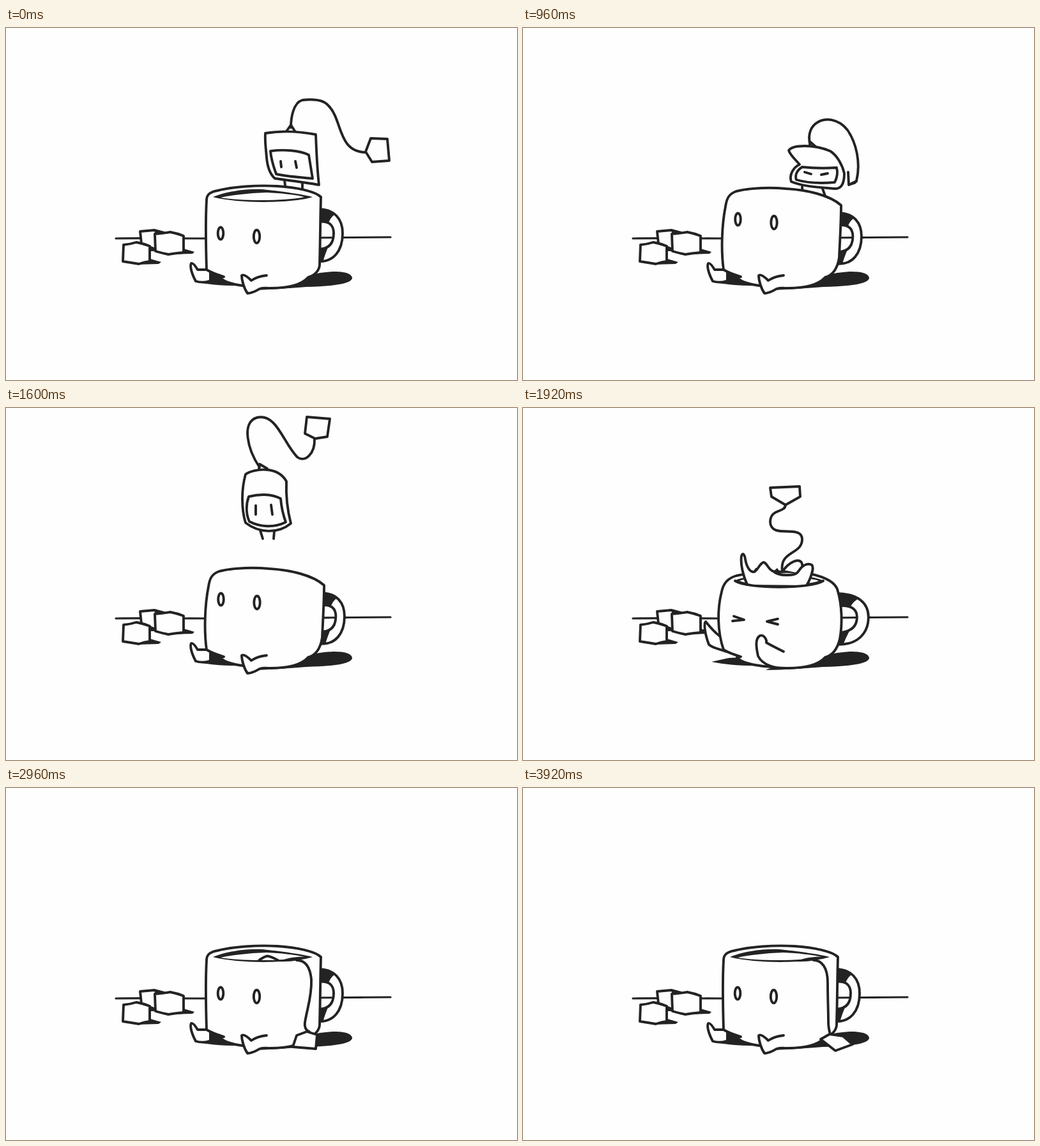
An HTML page for the animation above (4 s loop, 800x552 px).

```html
<!DOCTYPE html>
<html lang="en">
<head>
<meta charset="utf-8">
<title>Tea time</title>
<style>
html, body { margin: 0; width: 100%; height: 100%; overflow: hidden; background: #fefefe; }
svg { display: block; width: 100vw; height: 100vh; }
.line, .paper { stroke: #232323; stroke-width: 3.9; stroke-linecap: round; stroke-linejoin: round; vector-effect: non-scaling-stroke; }
.line { fill: none; }
.paper { fill: #fefefe; }
.ink { fill: #232323; }
.white { fill: #fefefe; }
</style>
</head>
<body>
<svg viewBox="0 0 800 552">
  <path class="line" style="stroke-width:3.2" d="M172 330C220 329 270 330 313 330M480 329L602 328"/>
  <g id="cubes">
    <path class="ink" d="M206 371L226 362L243 367L239 370ZM254 355L278 346L295 351L292 354Z"/>
    <path class="paper" d="M210 319L232 317L247 321L234 347L212 338Z"/>
    <path class="ink" d="M232 317L249 321L234 324ZM226 345L234 346L234 350L226 350Z"/>
    <path class="paper" d="M233 323Q246 322 257 320Q268 322 278 326L278 352Q266 353 254 355Q244 353 234 350Z"/>
    <path class="paper" d="M184 340Q195 339 204 336Q215 338 225 342L225 366Q217 367 208 370Q196 368 183 366Z"/>
  </g>
  <path class="ink" d="M380 411C388 405 440 400 474 388C500 380 541 379 542 392C541 402 508 405 470 406C440 408 410 411 380 411Z"/>
  <path class="ink" id="shade"/>
  <g id="cord">
    <path class="line" id="string"/>
    <path class="paper" id="tag"/>
  </g>
  <g id="bag">
    <path class="line" id="neck"/>
    <path class="line" id="knot"/>
    <path class="paper" id="sack"/>
    <path class="paper" id="face"/>
    <path class="line" id="look"/>
  </g>
  <g id="mug">
    <g id="handle">
      <path class="paper" fill-rule="evenodd" d="M488 284C515 284 527 300 527 322C527 350 512 368 488 366ZM488 304C505 302 513 308 513 322C513 338 505 347 488 347Z"/>
      <path class="ink" d="M490 284C502 284 509 287 515 292C510 296 507 300 505 306C500 303 495 303 490 304ZM490 348C497 347 501 345 505 342C501 351 498 360 496 367L490 367Z"/>
    </g>
    <path class="paper" id="footL"/>
    <path class="paper" id="body"/>
    <path class="ink" id="rim"/>
    <path class="white" id="tea"/>
    <path class="ink" id="glint" d="M428 272C440 266 455 264 472 265C462 270 446 273 428 272Z"/>
    <path class="paper" id="bump"/>
    <g id="splash">
      <path class="paper" d="M408 254C416 243 430 235 436 242C439 248 436 252 432 259"/>
      <path class="ink" d="M360 257L364 251L371 251L369 257ZM391 257L398 251L404 259Z"/>
      <path class="paper" d="M351 277C345 264 340 245 342 232C344 226 347 230 348 237C350 249 355 257 361 257C367 257 370 243 377 242C382 243 385 255 392 256C397 261 405 262 412 262C420 262 428 262 432 255C436 248 445 242 452 246C456 250 452 260 450 266C448 271 446 275 444 278"/>
    </g>
    <path class="line" id="lip" d="M332 271C352 284 450 284 470 271"/>
    <path class="paper" id="footR"/>
    <g id="open">
      <ellipse class="paper" cx="336" cy="322" rx="4.3" ry="9.5"/>
      <ellipse class="paper" cx="392.5" cy="327" rx="4.7" ry="10.3"/>
    </g>
    <path class="line" id="squint" d="M330 319L346 326.500L328 329M399 324.500L382 330L399 336"/>
  </g>
  <path class="paper" id="drop"/>
  <g id="dots"></g>
</svg>
<script>
const $ = id => document.getElementById(id);
const set = (id, attrs) => { for (const k in attrs) $(id).setAttribute(k, attrs[k]); };
const show = (id, on) => { $(id).style.display = on ? '' : 'none'; };

const LOOP = 4000, STEP = 80;

// Each pose of a part has the same path commands, so numbers can be blended.
const bodyPath = sides => 'M341 390C331 387 322 384 314 379' + sides +
  'C492 379 484 388 473 391C462 403 440 408 414 408C385 406 345 404 335 391Z';

const MUG = {
  rest: {
    body: bodyPath('C313 345 312 305 314 270C314 260 321 257 331 255C355 249 392 246 425 248C455 250 484 256 493 265C492 300 492 335 491 368'),
    rim: 'M324 265C345 256 375 252 402 253C430 256 460 260 480 265C450 275 365 276 324 265Z',
    tea: 'M336 266C352 262 380 259 408 258C430 259 450 261 467 265C440 271 372 272 336 266Z',
    footL: 'M318 379L300 379C297 374 293 368 290 369C288 372 289 382 297 397C303 399 312 399 318 397',
    footR: 'M408 388C398 389 390 392 384 396C381 393 373 385 369 388C369 396 373 409 378 416C386 416 392 412 397 409C403 407 409 408 414 408',
    shade: 'M295 398L318 380L341 390L372 404C345 405 315 402 295 398Z'
  },
  up: {
    body: bodyPath('C310 350 311 310 317 280C319 266 323 260 334 256C358 250 390 250 412 252C445 254 480 262 498 278C498 305 496 335 495 360'),
    rim: 'M326 258C345 252 375 251 402 252C430 252 460 256 478 262C450 262 365 254 326 258Z',
    tea: 'M336 257C352 253 380 252 405 253C430 253 452 256 467 260C440 260 370 254 336 257Z'
  },
  squash: {
    body: bodyPath('C304 350 304 315 311 288C314 274 321 267 334 263C355 258 400 256 425 257C455 259 485 267 492 284C500 310 500 340 496 362'),
    rim: 'M331 271C345 264 370 262 402 261C430 261 455 264 471 271C450 284 350 284 331 271Z',
    tea: 'M339 271C350 267 375 265 402 265C430 265 452 267 463 271C445 279 355 279 339 271Z',
    footL: 'M314 362L307 357C298 350 290 340 286 335C283 338 284 352 291 371C298 377 308 378 318 382',
    footR: 'M408 382C398 377 390 373 381 368C382 363 377 355 371 357C363 362 365 375 368 389C372 397 378 401 386 404C393 407 400 408 414 408',
    shade: 'M295 398L322 392L341 391L372 404C345 405 315 402 295 398Z'
  }
};
for (const p of ['footL', 'footR', 'shade']) MUG.up[p] = MUG.rest[p];

const BAG = {
  sit: {
    sack: 'M406 165C430 161 460 162 485 167C486 195 487 220 490 246C468 242 443 239 421 236C412 228 409 215 408 203C407 190 405 178 406 165Z',
    face: 'M414 193C435 190 460 192 474 199C476 212 478 224 480 236C460 234 440 233 423 229C419 218 415 205 414 193Z',
    look: 'M430 209L431 218M453 209L455 219',
    neck: 'M436 238L438 256M464 242L464 258',
    knot: 'M439 162L446 152L453 163'
  },
  duck: {
    sack: 'M416 192C422 183 455 182 481 193C492 200 500 215 503 228C503 245 498 252 489 252C465 250 440 249 420 241C416 230 424 218 433 214C427 207 418 199 416 192Z',
    face: 'M437 218C455 220 475 220 491 219C493 226 492 234 488 242C465 244 445 243 428 238C425 230 430 222 437 218Z',
    look: 'M441 226L451 229M467 230L477 228',
    neck: 'M437 249L438 262M469 252L474 266',
    knot: 'M449 184L449 178L458 186'
  },
  fly: {
    sack: 'M375 104C388 95 425 90 439 115C438 140 441 162 446 181C425 198 396 196 375 180C371 167 370 155 370 142C370 128 372 115 375 104Z',
    face: 'M380 139C395 135 415 134 430 142C431 155 434 168 438 179C420 188 398 187 381 178C375 165 376 150 380 139Z',
    look: 'M391 153L391 167M415 152L417 167',
    neck: 'M398 192L402 205M420 193L419 205',
    knot: 'M396 96L397 88L409 95'
  }
};

const tagPath = pts => 'M' + pts.split(' ').join('L') + 'Z';
const CORD = {
  sit: {
    string: 'M446 156C446 140 450 117 464 113C482 111 497 112 505 122C527 144 519 194 563 195',
    tag: tagPath('563,194 571,173 597,174 600,208 573,210')
  },
  duck: {
    string: 'M450 185C446 172 448 158 458 150C472 139 494 142 508 160C522 180 529 212 522 240',
    tag: tagPath('522,240 519,243 510,246 509,226 510,246')
  },
  whip: {
    string: 'M432 153C445 125 490 120 520 137C545 150 565 168 592 165',
    tag: tagPath('592,165 601,147 625,150 627,183 603,186')
  },
  fly: {
    string: 'M397 93C378 65 368 22 393 15C424 8 434 55 456 77C468 86 484 72 483 48',
    tag: tagPath('484,48 468,40 471,14 507,17 503,45')
  },
  fall: {
    string: 'M406 256C401 224 437 230 437 206C437 181 387 207 387 178C388 157 410 165 411 152',
    tag: tagPath('411,152 389,139 387,125 433,123 434,139')
  },
  hang: {
    string: 'M455 270C470 270 484 275 490 290C495 305 497 315 499 328C503 345 515 352 526 347',
    tag: tagPath('525,346 526,307 555,316 551,341 533,347')
  },
  out: {
    string: 'M455 270C470 270 484 275 491 290C500 300 510 318 520 322C528 325 535 324 541 322',
    tag: tagPath('541,322 549,303 573,310 570,335 550,338')
  },
  left: {
    string: 'M455 270C468 270 476 280 478 300C479 325 472 345 469 362C466 374 469 380 475 382',
    tag: tagPath('471,382 487,387 485,409 449,406 455,388')
  },
  lie: {
    string: 'M455 270C468 270 477 282 477 305C477 330 478 350 478 365C478 375 479 380 481 386',
    tag: tagPath('480,386 501,389 516,402 489,412 466,394')
  }
};

// Keys: [time, pose, dx, dy]
const MUG_KEYS = [[0, 'rest'], [560, 'rest'], [800, 'up'], [1760, 'up'], [1920, 'squash'],
  [2080, 'squash'], [2320, 'rest'], [4000, 'rest']];
const BAG_KEYS = [[0, 'sit'], [320, 'sit', -1, 3], [640, 'sit'], [880, 'duck'], [960, 'duck'],
  [1120, 'duck', 0, 4], [1280, 'fly', 35, 60], [1520, 'fly', 0, 2], [1600, 'fly'], [1680, 'fly', 0, -3],
  [1760, 'fly', 0, 4], [1840, 'fly', 6, 95], [1920, 'fly', 8, 210]];
const CORD_KEYS = [[0, 'sit'], [320, 'sit', -1, 3], [640, 'sit'], [880, 'duck'], [960, 'duck'],
  [1120, 'duck', 0, 4], [1280, 'whip'], [1520, 'fly', 0, 2], [1600, 'fly'], [1680, 'fly', 0, -3],
  [1760, 'fly', 0, 4], [1920, 'fall'], [2000, 'fall', 6, 45], [2320, 'hang', -3, -2], [2400, 'hang'],
  [2520, 'out'], [2960, 'left'], [3160, 'out'], [3440, 'lie'], [4000, 'lie']];
const SPLASH_KEYS = [[1840, 0.3], [1920, 1], [2000, 1.2], [2080, 1], [2240, 0.3], [2320, 0]];
const BUMP_KEYS = [[2800, 0], [2960, 1], [3120, 5], [3200, 5], [3400, 0]];

const mix = (a, b, k) => a + (b - a) * k;
const smooth = k => k * k * (3 - 2 * k);

function span(keys, t) {
  let i = keys.findIndex(key => key[0] > t);
  if (i < 0) i = keys.length;
  const a = keys[Math.max(i - 1, 0)], b = keys[Math.min(i, keys.length - 1)];
  const k = a === b ? 0 : (t - a[0]) / (b[0] - a[0]);
  return { a, b, k: smooth(k) };
}
function value(keys, t) {
  const { a, b, k } = span(keys, t);
  return mix(a[1], b[1], k);
}
function blend(p, q, k) {
  const nums = q.match(/-?[\d.]+/g);
  let i = 0;
  return p.replace(/-?[\d.]+/g, n => mix(+n, +nums[i++], k).toFixed(1));
}
function pose(poses, keys, t, group) {
  const { a, b, k } = span(keys, t);
  for (const part in poses[a[1]])
    set(part, { d: blend(poses[a[1]][part], poses[b[1]][part], k) });
  if (group) {
    const dx = mix(a[2] || 0, b[2] || 0, k), dy = mix(a[3] || 0, b[3] || 0, k);
    set(group, { transform: `translate(${dx} ${dy})` });
  }
  const share = name => (a[1] === name ? 1 - k : 0) + (b[1] === name ? k : 0);
  return { up: share('up'), squash: share('squash') };
}

// Droplets: place and radius at 320 ms after the burst
const DOTS = [[254, 270, 1.8], [297, 275, 2.4], [312, 257, 1.6], [341, 241, 1.8],
  [496, 238, 1.9], [509, 268, 2.6], [538, 258, 1.8]];
const BURST = 2080, FLIGHT = 320, FALL = 4e-4;
const dots = DOTS.map(([, , r]) => {
  const c = document.createElementNS('http://www.w3.org/2000/svg', 'circle');
  c.setAttribute('class', 'ink');
  c.setAttribute('r', r);
  return $('dots').appendChild(c);
});

function drawDrops(t) {
  const age = t - BURST, f = age / FLIGHT;
  show('dots', age > 80 && age <= 480);
  dots.forEach((dot, i) => {
    const [x, y] = DOTS[i];
    const rise = (y - 262 - FALL * FLIGHT ** 2) * f;
    dot.setAttribute('cx', mix(405, x, f));
    dot.setAttribute('cy', 262 + rise + FALL * age * age);
  });
  const dy = 8e-4 * ((t - 2380) ** 2 - 400);
  show('drop', t >= 2160 && t <= 2620);
  set('drop', {
    d: 'M398 207C400 200 411 199 414 206C417 212 411 217 406 218C401 217 396 212 398 207Z',
    transform: `translate(0 ${dy})`
  });
}

function drawMug(t) {
  const { up, squash } = pose(MUG, MUG_KEYS, t);
  const sx = 1 + squash * 0.28 - up * 0.03;
  const sy = 1 - squash * 0.03 - up * 0.03;
  const hx = 492 + up * 4 + squash * 4, hy = 284 + up * 6 + squash * 7;
  set('handle', { transform: `translate(${hx} ${hy}) scale(${sx} ${sy}) translate(-492 -284)` });

  for (const id of ['rim', 'tea']) show(id, up < 0.7);
  const tight = t >= 1840 && t < 2640;
  show('open', !tight);
  show('squint', tight);
  set('open', { transform: `translate(${up * 0.5} ${up * -22})` });
  set('squint', { transform: `translate(0 ${329 + squash * 5}) scale(1 ${1 - squash * 0.25}) translate(0 -329)` });

  const wet = t >= 1920 && t < 2320;
  show('splash', wet);
  show('lip', wet && squash > 0.5);
  show('glint', t >= 2320);
  set('splash', { transform: `translate(0 279) scale(1 ${value(SPLASH_KEYS, t)}) translate(0 -279)` });

  const h = value(BUMP_KEYS, t), w = 14 + h * 0.8;
  show('bump', h > 0.2);
  set('bump', {
    d: `M${411 - w} 270C${411 - w * 0.6} ${270 - h * 4} ${406 - h / 2} ${270 - h * 6} 409 ${270 - h * 6.5}` +
       `C${414 + h / 2} ${270 - h * 6} ${411 + w * 0.6} ${270 - h * 3} ${411 + w} 270`
  });
}

function draw(t) {
  drawMug(t);
  pose(BAG, BAG_KEYS, t, 'bag');
  show('bag', t < 1920);
  pose(CORD, CORD_KEYS, t, 'cord');
  // The cord goes from behind the cup to in front of it.
  if (t > 2040) $('mug').after($('cord'));
  else $('bag').before($('cord'));
  drawDrops(t);
}

function tick() {
  draw(Math.floor(performance.now() % LOOP / STEP) * STEP);
  requestAnimationFrame(tick);
}
tick();
</script>
</body>
</html>
```
